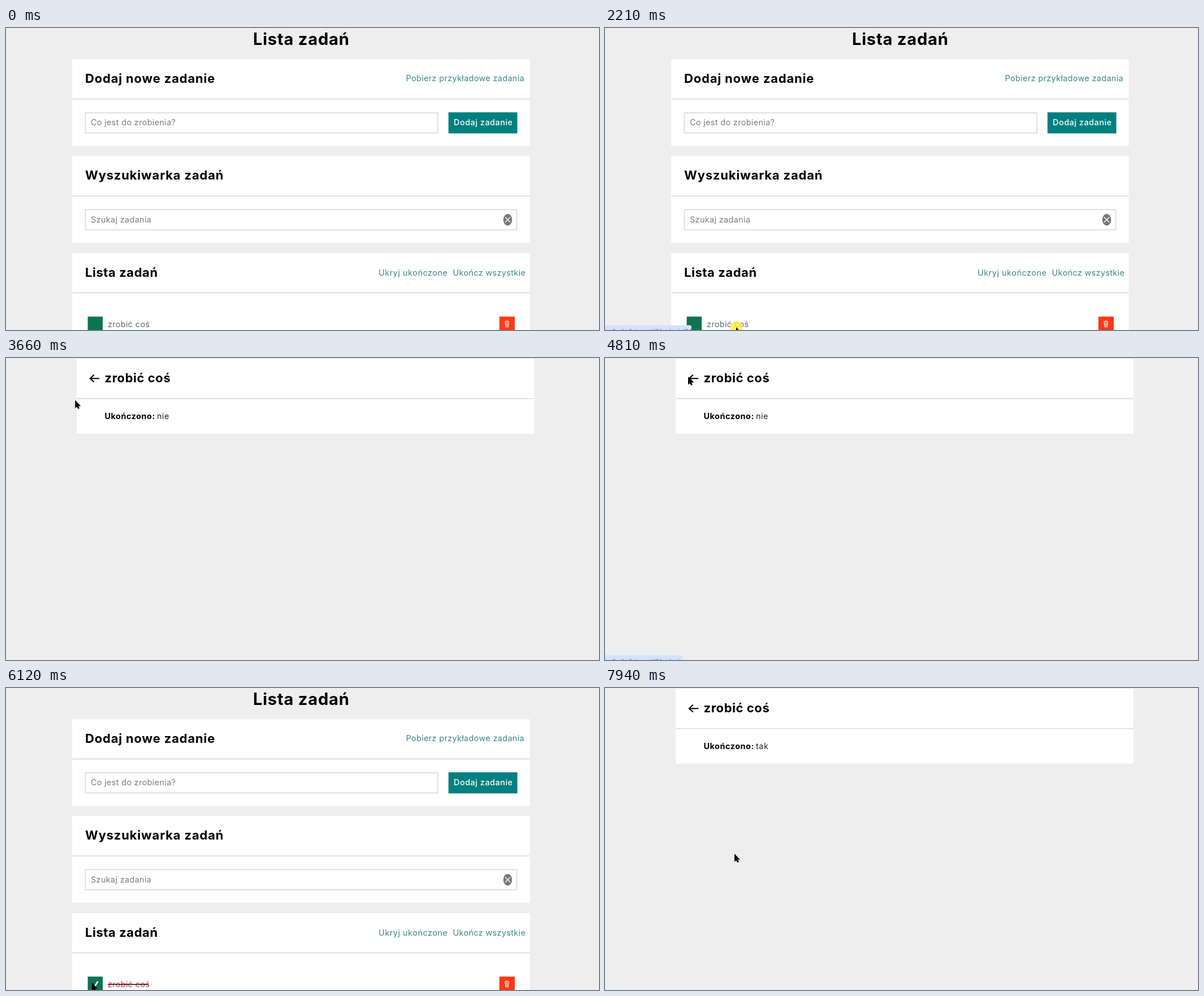
An HTML page that plays this animation: 1049x534 px, repeating every 8000 ms.

```html
<!DOCTYPE html>
<html lang="pl">
<head>
<meta charset="utf-8">
<title>Lista zadań</title>
<style>
  html, body { margin: 0; width: 100%; height: 100%; overflow: hidden; background: #eee; }
  svg { display: block; width: 100%; height: 100%; }
  text { font: 400 14.4px Inter, "Open Sans", sans-serif; letter-spacing: .025em; white-space: pre; }
  .h1 { font-size: 29.2px; font-weight: 700; }
  .h2 { font-size: 22px; font-weight: 700; }
  .wide { letter-spacing: .037em; }
  .b { font-weight: 700; }
  .m { font-weight: 500; fill: #fff; }
  .link { fill: #3d8588; }
  .hint { fill: #7b7b7b; }
  .item { fill: #556b7c; }
  .url { font: 10.6px "Open Sans", sans-serif; letter-spacing: 0; fill: #474f5c; }
  .done .item { fill: #d0393f; }
</style>
</head>
<body>
<svg id="stage" viewBox="0 0 1049 534" xmlns="http://www.w3.org/2000/svg"></svg>
<script>
const LOOP = 8000, STEP = 82;
const $ = id => document.getElementById(id);

const rect = (x, y, w, h, fill) =>
  `<rect x="${x}" y="${y}" width="${w}" height="${h}" fill="${fill}"/>`;
const text = (x, y, str, cls = '', more = '') =>
  `<text x="${x}" y="${y}" class="${cls}" ${more}>${str}</text>`;
const line = (d, color, w, more = '') =>
  `<path d="${d}" fill="none" stroke="${color}" stroke-width="${w}" ${more}/>`;
const field = (y, w, hint) =>
  `<rect x="140.4" y="${y}" width="${w}" height="35.5" fill="#fff" stroke="#ddd" stroke-width="1.8"/>`
  + text(150, y + 22.2, hint, 'hint');
const card = (x, y, h) =>
  rect(x, y, 809.5, h, '#fff') + rect(x, y + 69.4, 809.5, 1.7, '#ddd');
const section = (y, title, cls = '') =>
  card(117, y, 153.3) + text(140, y + 41.8, title, 'h2 ' + cls);

const listPage = `<g id="list">
  ${text(437, 30, 'Lista zadań', 'h1')}
  ${section(55.3, 'Dodaj nowe zadanie', 'wide')}
  ${text(707.5, 94.4, 'Pobierz przykładowe zadania', 'link')}
  ${field(150, 623.6, 'Co jest do zrobienia?')}
  ${rect(782.7, 149.1, 121.8, 37.3, '#008080')}
  ${text(792, 172.2, 'Dodaj zadanie', 'm wide')}
  ${section(226.6, 'Wyszukiwarka zadań', 'wide')}
  ${field(321.3, 763.2, 'Szukaj zadania')}
  <ellipse cx="887.5" cy="339" rx="7.8" ry="10.3" fill="#777"/>
  ${line('M883 334.4l9 9m0-9l-9 9', '#fff', 1.4)}
  ${section(398, 'Lista zadań')}
  ${text(659, 437.6, 'Ukryj ukończone', 'link wide')}
  ${text(790.5, 437.6, 'Ukończ wszystkie', 'link')}
  ${rect(144.6, 510.3, 26.5, 27, '#0f7350')}
  ${text(180, 529, 'zrobić coś', 'item')}
  <g id="marks">
    ${line('M153.3 524.4l3.2 4.2 6-10', '#fff', 2.4)}
    ${line('M180 524.2h72', '#111', 1.5)}
  </g>
  ${rect(872.8, 510.3, 27.2, 27, '#fa3a18')}
  ${line('M882 519.2h8M883 519.5l.8 9.3h4.6l.8-9.3M885.2 521v6.5M887 521v6.5M884.4 518h3.4', '#ffe9dc', 1.1)}
</g>`;

const detailPage = `<g id="detail">
  ${card(125, 1.4, 132.4)}
  ${line('M165.2 36.2h-16.4m7-6.4l-7 6.4 7 6.4', '#000', 2.1)}
  ${text(174.5, 43.2, 'zrobić coś', 'h2')}
  ${text(174.5, 108, 'Ukończono:', 'b wide')}
  ${text(267, 108, 'nie', 'wide', 'id="state" fill="#222"')}
</g>`;

$('stage').innerHTML = rect(0, 0, 1049, 534, '#eee') + listPage + detailPage + `
  <g id="bubble">
    <rect id="back" x="-6" y="525.5" height="20" rx="3.5" fill="#d3e3fd"/>
    ${text(4, 540.2, '', 'url', 'id="url"')}
  </g>
  <circle id="click" r="11" fill="#ffee3c" fill-opacity=".8"/>
  <g id="cursor">
    <path id="arrow" d="M0 0V14.2l3.1-2.6 2.2 4 2.6-1.3-2-3.8H10z"/>
    <path id="hand" d="M-.6 0Q.6-1 1.6 0V4.6L6 5.8Q7 6.2 6.8 8L6 13H-.4L-3.4 8Q-3.6 6.6-2 7L-.6 8.2z"/>
  </g>`;

// Each move goes from where the last one ended, optionally bent towards a point
const moves = [
  { from: 400, to: 1200, end: [311, 432], bend: [600, 188] },
  { from: 1290, to: 1550, end: [232, 529] },
  { from: 3230, to: 3900, end: [110, 43], bend: [160, 160] },
  { from: 4070, to: 4320, end: [147, 33] },
  { from: 4980, to: 5640, end: [152, 521] },
  { from: 6210, to: 6700, end: [203, 523] },
  { from: 7690, to: 7940, end: [229, 293] }
];

// Things pointed at: hovered, clicked, and the moment the click takes effect
const task = { width: 153, url: '…/todo-list-react/#/zadania/14' };
const back = { width: 137, url: '…/todo-list-react/#/zadania' };
const check = { hover: 5640, click: 5960, act: 6040 };
const links = [
  { hover: 1720, click: 2210, act: 2300, ...task },
  { hover: 4150, click: 4730, act: 4890, ...back },
  { hover: 6870, click: 7350, act: 7440, ...task }
];
const targets = [...links, check];

const clamp = v => Math.max(0, Math.min(1, v));
const show = (id, on) => $(id).setAttribute('display', on ? 'inline' : 'none');

function pointer(t) {
  let pos = [1000, 530];
  if (t < moves[0].from) return [1000, 560];
  for (const { from, to, end, bend } of moves) {
    if (t < from) break;
    const step = Math.floor((t - from) / STEP) + 1;
    const u = clamp(step * STEP / (to - from + STEP));
    const e = u * (2 - u);
    pos = pos.map((p, k) => {
      const c = bend ? bend[k] : (p + end[k]) / 2;
      return p * (1 - e) ** 2 + 2 * c * e * (1 - e) + end[k] * e * e;
    });
  }
  return pos;
}

function draw(t) {
  const detail = links.filter(l => t >= l.act).length % 2 === 1;
  const done = t >= check.act;
  show('list', !detail);
  show('detail', detail);
  show('marks', done);
  $('list').setAttribute('class', done ? 'done' : '');
  $('state').textContent = done ? 'tak' : 'nie';

  // The address lingers after a click, then fades
  const link = links.filter(l => t >= l.hover).pop();
  const fade = link ? 1 - clamp((t - link.click - 380) / 170) : 0;
  show('bubble', fade > 0);
  if (link) {
    $('bubble').setAttribute('opacity', fade);
    $('back').setAttribute('width', link.width + 6);
    $('url').textContent = link.url;
  }

  const [x, y] = pointer(t);
  const hand = targets.some(s => t >= s.hover && t < s.click);
  $('cursor').setAttribute('transform', `translate(${x} ${y})`);
  show('arrow', !hand);
  show('hand', hand);
  $('click').setAttribute('cx', x + 0.5);
  $('click').setAttribute('cy', y);
  show('click', targets.some(s => t >= s.click && t < s.click + 80));
}

const start = performance.now();
function tick() {
  draw((performance.now() - start) % LOOP);
  requestAnimationFrame(tick);
}
draw(0);
requestAnimationFrame(tick);
</script>
</body>
</html>
```
